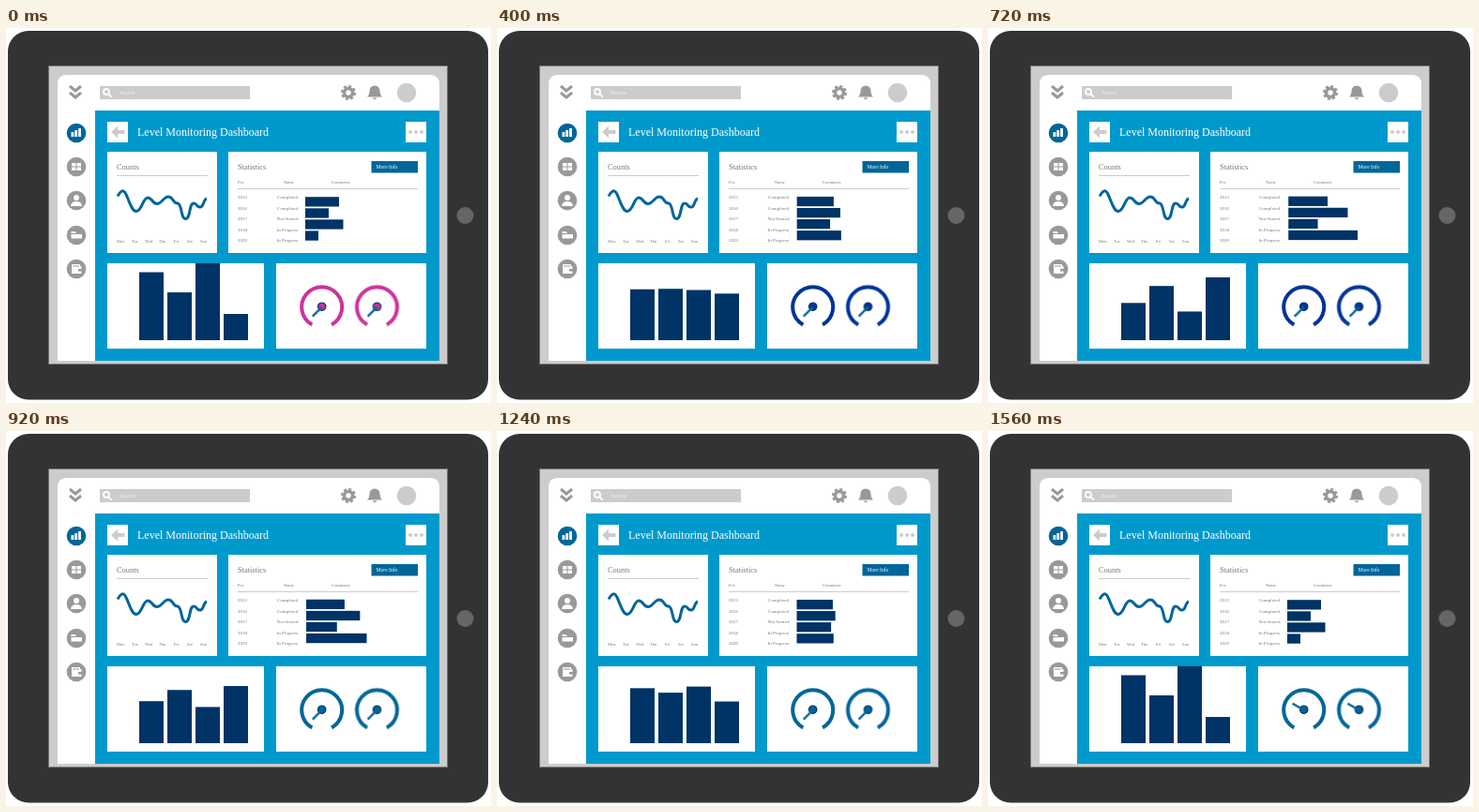
Animation, 517 px wide and 400 px high, one loop 1.6 s. Source, as an HTML page:

```html
<!DOCTYPE html>
<html lang="en">
<head>
<meta charset="utf-8">
<title>Level Monitoring Dashboard</title>
<style>
  @property --p { syntax: '<number>'; inherits: true; initial-value: 0; }

  html, body { margin: 0; width: 100%; height: 100%; overflow: hidden; background: #fff; }
  svg { display: block; width: 517px; height: 400px; animation: swing 1.6s infinite; }
  text { font-family: "Liberation Serif", Times, serif; fill: #777; }

  .w { fill: #fff; }
  .g { fill: #999; }
  .tiny { font-size: 4.5px; }
  .cell { font-size: 5px; }
  .mid { text-anchor: middle; }

  .col, .row { fill: #036; }
  .col {
    --top: calc((var(--a) + var(--d) * var(--p)) * 1px);
    y: var(--top);
    height: calc(333px - var(--top));
    width: 26px;
  }
  .row {
    x: calc(319px + var(--p) * 1.3px);
    width: calc((var(--a) - 319 + (var(--d) - 1.3) * var(--p)) * 1px);
    height: 10.3px;
  }
  .rows { transform: translateY(calc(var(--p) * -.6px)); }

  .gauge { fill: none; animation: tint 1.6s step-end infinite; }
  .ring { stroke: currentColor; stroke-width: 4; }
  .hub { fill: currentColor; stroke: #036; stroke-width: 1.2; }
  .needle { stroke: #069; stroke-width: 2.4; animation: turn 1.6s step-end infinite; }

  /* rises for 19 ticks of 40 ms, falls for 20, rests for one */
  @keyframes swing {
    0% { --p: 0; animation-timing-function: steps(19); }
    47.5% { --p: 1; animation-timing-function: steps(20); }
    97.5%, 100% { --p: 0; }
  }
  @keyframes tint {
    0% { color: #c39; }
    25% { color: #039; }
    47.5%, 100% { color: #069; }
  }
  @keyframes turn {
    0% { transform: rotate(-135deg); }
    25% { transform: rotate(-60deg); }
    47.5% { transform: rotate(0deg); }
    72.5% { transform: rotate(48deg); }
    97.5%, 100% { transform: rotate(103deg); }
  }
</style>
</head>
<body>
<svg viewBox="0 0 517 400">
  <defs>
    <g id="gauge">
      <path class="ring" d="M-10.4 18.8A21.5 21.5 0 1 1 10.4 18.8"/>
      <circle class="hub" r="4.2" cy="-.5"/>
      <path class="needle" d="M0 0V-14"/>
    </g>
  </defs>

  <!-- tablet -->
  <rect x="2" y="3" width="512" height="393.5" rx="22" fill="#333"/>
  <circle cx="489.5" cy="200" r="9" fill="#666"/>
  <rect x="45.5" y="40.5" width="425" height="318" fill="#ccc" stroke="#777"/>
  <path class="w" d="M55 355V60Q55 50 65 50H452Q462 50 462 60V355Z"/>
  <rect x="95" y="88" width="367" height="267" fill="#09c"/>

  <!-- top bar -->
  <path d="M68 62l6 5 6-5M68 69l6 5 6-5" fill="none" stroke="#999" stroke-width="3"/>
  <rect x="100" y="62" width="160" height="14" fill="#ccc"/>
  <g fill="none" stroke="#fff" stroke-width="1.8">
    <circle cx="107" cy="68" r="3"/>
    <path d="M109.200 70.200l3.500 3.500"/>
  </g>
  <text x="121" y="71" class="w" font-size="6" opacity=".7">Search</text>
  <g transform="translate(365 69)" fill="none" stroke="#999">
    <circle r="4.500" stroke-width="3.600"/>
    <circle r="6.800" stroke-width="2.600" stroke-dasharray="3 2.340"/>
  </g>
  <path class="g" d="M385 73.500Q387.500 71.500 387.500 67.500Q387.500 62 393 61.500Q398.500 62 398.500 67.500Q398.500 71.500 401 73.500ZM390.500 74.500H395.500Q393 78 390.500 74.500Z"/>
  <circle cx="427" cy="69" r="10.300" fill="#ccc"/>

  <!-- side bar -->
  <circle cx="75" cy="112" r="10.300" fill="#069"/>
  <g class="g">
    <circle cx="75" cy="148" r="10.300"/>
    <circle cx="75" cy="184" r="10.300"/>
    <circle cx="75" cy="221" r="10.300"/>
    <circle cx="75" cy="257" r="10.300"/>
  </g>
  <g class="w">
    <path d="M69.500 111h2.800v5h-2.800zM73.300 109h2.800v7h-2.800zM77.100 107h2.800v9h-2.800z"/>
    <path d="M70 144h4.500v3.500H70zM75.500 144H80v3.500h-4.500zM70 148.500h4.500v3.500H70zM75.500 148.500H80v3.500h-4.500z"/>
    <circle cx="75" cy="181" r="3"/>
    <path d="M69 190Q69.500 185 75 185Q80.500 185 81 190Z"/>
    <path d="M69.500 217h4l1.500 2h-5.500zM69.500 220H81v4.500H69.500z"/>
    <path d="M70 252h9v2h1.500v8H70z"/>
  </g>
  <path class="g" d="M71 253.500h7v1h-7zM77 257h4v2.500h-4z"/>

  <!-- title row and panels -->
  <path class="w" d="M108 100h22v22h-22zM426 100h22v22h-22zM108 132h117v108H108zM237 132h211v108H237zM108 251h167v91H108zM288 251h160v91H288z"/>
  <path d="M112 111l7-6.500v4.500h7.500v4H119v4.500z" fill="#ccc"/>
  <path d="M431 111h.01M437 111h.01M443 111h.01" stroke="#ccc" stroke-width="4" stroke-linecap="round"/>
  <text x="140" y="115" class="w" font-size="12">Level Monitoring Dashboard</text>

  <!-- counts -->
  <text x="118" y="150.500" font-size="8.400">Counts</text>
  <path d="M118 157.500H215M247 171.500H439" stroke="#ccc"/>
  <path d="M119 179.500C121 175 125 171 127.500 176.500C131 183 134 196 139 195.500C145 195 146 181 151 181C156 181 156 187.500 161 187.500C166 187.500 168 180 173 180C179 180 177 187 183 187C188 188 186 203.500 191.500 203.500C197 203 195 187 200 187C204 187 203 191.500 207 191C211 191 210 183 214 182" fill="none" stroke="#069" stroke-width="3"/>
  <g class="tiny">
    <text x="118" y="229">Mon</text>
    <text x="134" y="229">Tue</text>
    <text x="148" y="229">Wed</text>
    <text x="163" y="229">Thu</text>
    <text x="179" y="229">Fri</text>
    <text x="193" y="229">Sat</text>
    <text x="207" y="229">Sun</text>
  </g>

  <!-- statistics -->
  <text x="247" y="150.500" font-size="8.400">Statistics</text>
  <rect x="389.500" y="142" width="49.500" height="12.500" fill="#069"/>
  <text x="394.500" y="150" class="w" font-size="5.600">More Info</text>
  <g class="tiny">
    <text x="247" y="166">Pos</text>
    <text x="296" y="166">Name</text>
    <text x="347" y="166">Comments</text>
  </g>
  <g class="cell">
    <text x="247" y="182">2012</text><text class="mid" x="300" y="182">Completed</text>
    <text x="247" y="193.500">2016</text><text class="mid" x="300" y="193.500">Completed</text>
    <text x="247" y="205">2017</text><text class="mid" x="300" y="205">Not Started</text>
    <text x="247" y="216.500">2018</text><text class="mid" x="300" y="216.500">In Progress</text>
    <text x="247" y="228">2020</text><text class="mid" x="300" y="228">In Progress</text>
  </g>
  <g class="rows">
    <rect class="row" y="180.200" style="--a:355;--d:7.400"/>
    <rect class="row" y="192.300" style="--a:344;--d:41.700"/>
    <rect class="row" y="204.300" style="--a:359.500;--d:-8.400"/>
    <rect class="row" y="216.400" style="--a:333;--d:64.400"/>
  </g>

  <!-- columns -->
  <rect class="col" x="142" style="--a:260.500;--d:34.600"/>
  <rect class="col" x="172" style="--a:282;--d:-7.200"/>
  <rect class="col" x="202" style="--a:250.800;--d:54.500"/>
  <rect class="col" x="232" style="--a:305;--d:-41.200"/>

  <!-- gauges -->
  <g class="gauge">
    <use href="#gauge" x="336.700" y="297.700"/>
    <use href="#gauge" x="395.500" y="297.700"/>
  </g>
</svg>
</body>
</html>
```
